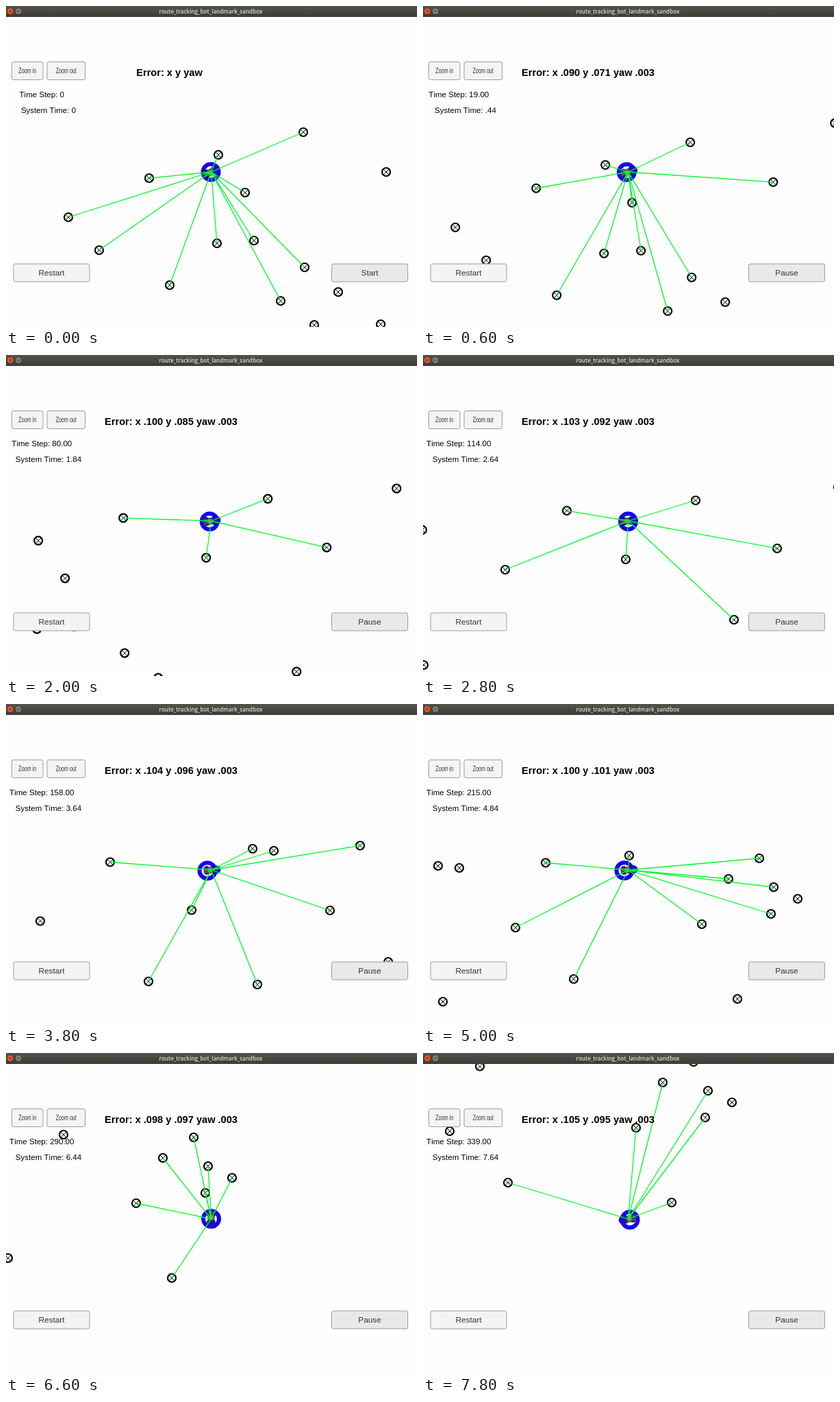
These frames come from a looping animation (600x468 px, 8 s). An HTML page:

```html
<!DOCTYPE html>
<html lang="en">
<head>
<meta charset="utf-8">
<title>Landmark sandbox</title>
<style>
  html, body { margin: 0; width: 100%; height: 100%; overflow: hidden; background: #fefefe; }
  svg { display: block; width: 100vw; height: 100vh; }
  text { font-family: "Liberation Sans", Arial, sans-serif; font-kerning: none; text-anchor: middle; }
  .title { font: 600 8.1px "Open Sans", sans-serif; fill: #dfdbd2; }
  .error { font-size: 14.6px; font-weight: bold; }
  .info { font-size: 11.55px; }
  .label { font-size: 11.8px; fill: #323232; }
  .narrow { font-size: 10.2px; fill: #323232; }
  .button { stroke: #9c9c9c; stroke-width: 1; }
</style>
</head>
<body>
<svg viewBox="0 0 600 468">
  <defs>
    <linearGradient id="bar" x2="0" y2="1">
      <stop offset="0" stop-color="#55534b"/><stop offset="1" stop-color="#3c3b37"/>
    </linearGradient>
    <g id="landmark" fill="none" stroke="#000">
      <circle r="6" stroke-width="2.2"/>
      <path d="M-4-4 4 4M4-4-4 4" stroke-width="1"/>
    </g>
  </defs>
  <rect width="600" height="468" fill="#fefefe"/>
  <g id="marks"></g>
  <circle id="estimate" r="11.5" fill="none" stroke="#1400f5" stroke-width="6"/>
  <g id="car">
    <rect x="-11" y="-5" width="20" height="10" rx="2" fill="#4b4d58"/>
    <path d="M-9-5h5M-9 5h5M2-5h5M2 5h5" stroke="#15151c" stroke-width="2"/>
    <rect x="-5" y="-3" width="6" height="6" fill="#85878c"/>
    <circle cx="8" r="6" fill="#1a0ad8"/>
    <path d="M3-3v6" stroke="#30323c" stroke-width="2"/>
  </g>
  <path id="rays" fill="none" stroke="#00fa2c" stroke-width="1.3"/>
  <g id="buttons"></g>
  <text id="error" class="error" y="102"></text>
  <text id="step" class="info" x="52.3" y="133"></text>
  <text id="clock" class="info" x="62" y="155.7"></text>
  <rect width="600" height="16" fill="url(#bar)"/>
  <circle cx="6.3" cy="7.6" r="4.8" fill="#ea5a2d" stroke="#33302b" stroke-width=".7"/>
  <path d="M4.6 5.9 8 9.3M8 5.9 4.6 9.3" stroke="#5b2412" stroke-width="1"/>
  <circle cx="18.2" cy="7.6" r="4.8" fill="#807e75" stroke="#33302b" stroke-width=".7"/>
  <path d="M16 7.6h4.4" stroke="#3b3a35" stroke-width="1"/>
  <text class="title" x="299" y="10.5">route_tracking_bot_landmark_sandbox</text>
</svg>
<script>
const LOOP = 8, TICK = 0.2, RANGE = 225;
const HUB = { x: 299.5, y: 242 };
const byId = id => document.getElementById(id);

// Landmarks on the map, in stage units at the starting view
const landmarks = [
  [434, 184], [310, 217], [209, 251], [349, 272], [91, 308], [136, 356], [308, 346],
  [362, 342], [436, 381], [239, 407], [401, 430], [485, 417], [450, 465], [547, 464],
  [555, 242], [645, 156], [687, 408], [833, 141], [952, 211], [889, 315], [731, 227],
  [1041, 121.5], [1072, 124.5], [1198, 117], [1154, 211.5], [1048, 319.5], [1239, 286.5],
  [1320, 106.5], [1510, 110.5], [1465, 140.5], [1531, 152.5], [1527, 191.5],
  [1566, 169.5], [1426, 206.5], [1478, 315.5]
];

// Driven route: seconds, x, y
const route = [
  [0.16, 0, 0], [1.2, 122, -33], [2.8, 435, -71], [3.8, 681, -89.5], [5, 1019, -114.5],
  [5.4, 1109, -122], [5.8, 1175, -112.5], [6, 1200, -96.5], [6.6, 1236, -12.5],
  [7.2, 1199, 61], [7.8, 1115, 97.5]
];

// Readings: seconds, step, x error, y error, estimate offset x, y
const readings = [
  [0.16, 0, 0.085, 0.065, -0.5, 0], [1.2, 46, 0.097, 0.078, -4.5, 0.7],
  [2.8, 114, 0.103, 0.092, 0, 0.7], [3.8, 158, 0.104, 0.096, -5.5, 1],
  [5, 215, 0.1, 0.101, -5.5, 0.7], [6.6, 290, 0.098, 0.097, 0, -0.3],
  [7.8, 339, 0.105, 0.095, 2.5, 1]
];

function segment(keys, t) {
  let i = 0;
  while (i < keys.length - 2 && t >= keys[i + 1][0]) i++;
  const span = keys[i + 1][0] - keys[i][0];
  return { i, span, u: Math.min(1, Math.max(0, (t - keys[i][0]) / span)) };
}

function linear(keys, t, k) {
  const { i, u } = segment(keys, t);
  return keys[i][k] + (keys[i + 1][k] - keys[i][k]) * u;
}

const slope = (i, k) => (route[i + 1][k] - route[i][k]) / (route[i + 1][0] - route[i][0]);

function tangent(i, k) {
  const last = route.length - 1;
  if (i === 0) return 2 * slope(0, k) - tangent(1, k);
  if (i === last) return 2 * slope(last - 1, k) - tangent(last - 1, k);
  const before = route[i][0] - route[i - 1][0], after = route[i + 1][0] - route[i][0];
  return (slope(i - 1, k) * after + slope(i, k) * before) / (before + after);
}

function position(t, k) {
  const { i, span, u } = segment(route, t), v = 1 - u;
  return v * v * (1 + 2 * u) * route[i][k] + u * u * (3 - 2 * u) * route[i + 1][k]
    + span * u * v * (v * tangent(i, k) - u * tangent(i + 1, k));
}

function heading(t) {
  const a = Math.min(7.78, Math.max(0.16, t - 0.01)), b = a + 0.02;
  return Math.atan2(position(b, 2) - position(a, 2), position(b, 1) - position(a, 1)) * 180 / Math.PI;
}

function button(x, y, w, h, fill, text, narrow) {
  const cx = x + w / 2, cy = y + h / 2 + (narrow ? 3.7 : 4.2);
  return `<rect class="button" x="${x}" y="${y}" width="${w}" height="${h}" rx="2.5" fill="${fill}"/>` +
    `<text class="${narrow ? "narrow" : "label"}" transform="translate(${cx} ${cy})` +
    `${narrow ? " scale(.7 1)" : ""}">${text}</text>`;
}

byId("buttons").innerHTML =
  button(8.5, 81.5, 45.5, 26, "#f4f4f4", "Zoom in", true) +
  button(60, 81.5, 55.5, 26, "#f4f4f4", "Zoom out", true) +
  button(11, 376, 111, 26, "#f4f4f4", "Restart") +
  button(475.5, 376, 111, 26, "#e9e9e9", "Start");
const toggle = byId("buttons").lastChild;

byId("marks").innerHTML = landmarks.map(() => '<use href="#landmark"/>').join("");
const marks = [...byId("marks").children];

const decimal = v => v.toFixed(3).slice(1);

function render(t) {
  const camX = position(t, 1), camY = position(t, 2);
  let rays = "";
  landmarks.forEach(([wx, wy], i) => {
    const x = wx - camX, y = wy - camY;
    marks[i].setAttribute("transform", `translate(${x} ${y})`);
    if (Math.hypot(x - HUB.x, y - HUB.y) < RANGE) rays += `M${HUB.x} ${HUB.y}L${x} ${y}`;
  });
  byId("rays").setAttribute("d", rays);

  const read = k => linear(readings, t, k);
  byId("estimate").setAttribute("transform", `translate(${HUB.x + read(4)} ${HUB.y + read(5)})`);
  byId("car").setAttribute("transform", `translate(${HUB.x} ${HUB.y}) rotate(${heading(t)})`);

  const idle = t < TICK / 2;
  byId("error").setAttribute("x", idle ? 238.5 : 241);
  byId("error").textContent = idle ? "Error: x y yaw"
    : `Error: x ${decimal(read(2))} y ${decimal(read(3))} yaw .003`;
  byId("step").textContent = "Time Step: " + (idle ? "0" : Math.round(read(1)).toFixed(2));
  byId("clock").textContent = "System Time: " + (idle ? "0" : (t - 0.16).toFixed(2).replace(/^0/, ""));
  toggle.textContent = idle ? "Start" : "Pause";
}

const start = performance.now();
let shown = -1;

function loop(now) {
  const seconds = Math.max(0, now - start) / 1000 % LOOP;
  const tick = Math.floor(seconds / TICK + 1e-6);
  if (tick !== shown) render((shown = tick) * TICK);
  requestAnimationFrame(loop);
}
loop(start);
</script>
</body>
</html>
```
